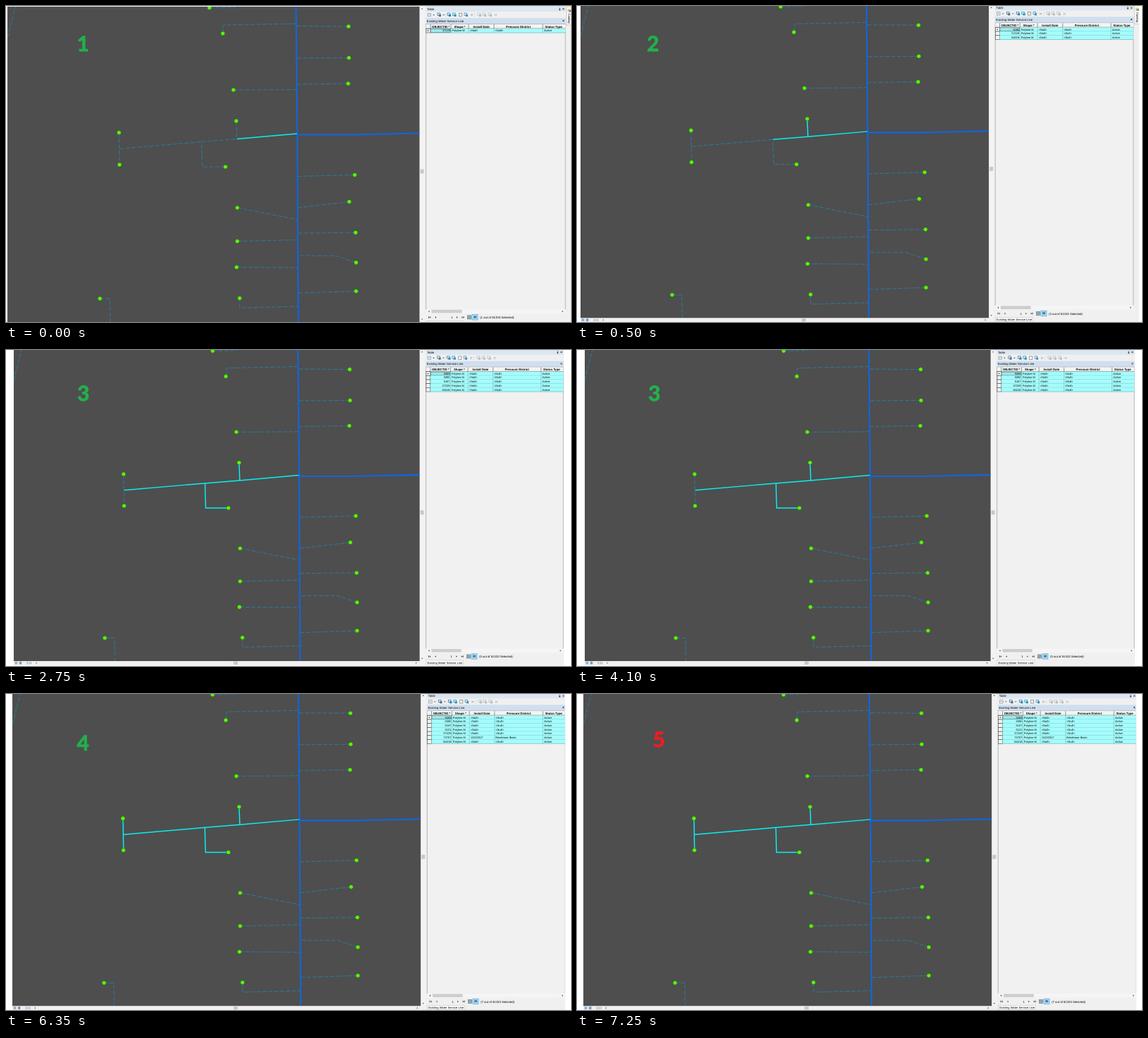
These frames come from a looping animation (800 px wide and 448 px high, 8000 ms). An HTML page:

```html
<!DOCTYPE html>
<html lang="en">
<head>
<meta charset="utf-8">
<title>Service line trace</title>
<style>
  html, body { margin: 0; width: 100%; height: 100%; overflow: hidden; background: #fff; }
  svg { display: block; width: 800px; height: 448px; }
  text { font-family: "Liberation Sans", Arial, sans-serif; text-rendering: geometricPrecision; }
  .step { font: 700 29.5px Lato, "Open Sans", sans-serif; stroke-width: .9px; }
</style>
</head>
<body>
<svg id="stage" viewBox="0 0 800 448"></svg>
<script>
const LOOP = 8000;
const GREEN = '#22b14c', RED = '#ed1c24';

// view: x scale, y scale, x shift, y shift, right edge; depth: how far the trace has run
const scenes = [
  { at: 0,    view: [1, 1, 0, 0, 800],             depth: 1, label: ['1', 109, 64, GREEN] },
  { at: 500,  view: [.991, .991, 2.9, -1.5, 796],  depth: 2, label: ['2', 107.5, 64, GREEN] },
  { at: 2750, view: [.985, .987, 8.9, -1.1, 790],  depth: 3, label: ['3', 109.5, 72, GREEN] },
  { at: 5000, view: [.991, .991, 7, -1.5, 791.5],  depth: 4, label: ['4', 109, 80, GREEN] },
  { at: 7250, view: [.991, .991, 7, -1.5, 791.5],  depth: 4, label: ['5', 116, 74.5, RED] }
];

// Services: each starts at its meter dot
const services = [
  'M288 2.5 324 1.5V-2', 'M307 39 308 27 411 25', 'M322 119 412 118.5',
  'M327.5 286 413 303', 'M327.5 333.5 413 331.5', 'M326.5 370.3 413 371',
  'M330.8 414.3 331 428 414 426', 'M133 414.8H147L147.5 448',
  'M485 29 411 28.5', 'M485.5 73.5 411 74', 'M484.5 110 412 111',
  'M493.8 239.5 413 241.5', 'M486 277.5 413 286', 'M495 321.2 413 322',
  'M495.7 363.7 467 354H413', 'M495.7 404.3 414 407'
];
// Traced network: [depth at which it is selected, path]
const traced = [
  [1, 'M327 188.5 412 181'],
  [2, 'M326 163 327 188.5'],
  [2, 'M277 192.5 327 188.5'],
  [3, 'M310.5 228H278L277 192.5'],
  [3, 'M161 202.5 277 192.5'],
  [4, 'M160 179.5 161 225']
];
const tracedDots = [[326, 163], [310.7, 228], [160, 179.5], [160.7, 225]];

// Table records: [depth, id, install date, district]
const records = [
  [3, '5089'], [2, '5090'], [3, '5107'], [4, '5121'], [1, '37229'],
  [4, '73707', '1/20/2017', 'Brindmoor Basin'], [2, '84218']
];
const columns = [[601, 630, 'OBJECTID *'], [630, 655, 'Shape *'], [655, 691, 'Install Date'],
  [691, 760, 'Pressure District'], [760, 791, 'Status Type']];

const rect = (x, y, w, h, fill, more = '') =>
  `<rect x="${x}" y="${y}" width="${w}" height="${h}" fill="${fill}" ${more}/>`;
const path = (d, color, width = 1, more = '') =>
  `<path d="${d}" fill="none" stroke="${color}" stroke-width="${width}" ${more}/>`;
const solid = (d, fill) => `<path d="${d}" fill="${fill}"/>`;
const dot = ([x, y]) => `<circle cx="${x}" cy="${y}" r="2.8" fill="#55ff00" stroke="#3f6a2a" stroke-width=".5"/>`;
const text = (s, x, y, size = 4.3, more = '') =>
  `<text x="${x}" y="${y}" font-size="${size}" ${more}>${s.replace(/</g, '&lt;').replace(/>/g, '&gt;')}</text>`;
const arrow = (x, y, dir, fill = '#333') => solid(`M${x} ${y - 1.3}v2.6l${1.5 * dir}-1.3z`, fill);
const cross = (x, y, color, r = 1.1) =>
  path(`M${x - r} ${y - r}l${2 * r} ${2 * r}m0 ${-2 * r}l${-2 * r} ${2 * r}`, color, .8);
const dashed = d => path(d, '#2581a8', .9, 'stroke-dasharray="6 2.4"');

function drawMap(depth) {
  let s = rect(2, 1, 583.7, 447, '#4e4e4e') + '<g clip-path="url(#map)">';
  s += dashed('M14 -2 2.5 44') + services.map(dashed).join('');
  s += traced.filter(t => t[0] > depth).map(t => dashed(t[1])).join('');
  s += path('M410.6 -2 412.4 182 413.9 450', '#0669fb', 1.8);
  s += path('M412.4 182.4H490L588 180.4', '#0669fb', 1.8);
  s += traced.filter(t => t[0] <= depth).map(t => path(t[1], '#08eef2', 1.5)).join('');
  const ends = services.map(d => d.match(/[\d.]+/g).slice(0, 2));
  return s + [...ends, ...tracedDots].map(dot).join('') + '</g>';
}

function drawScrollbars() {
  let s = rect(585.7, 0, 6.8, 448, '#f3f3f3') + rect(586.6, 231.5, 5, 6, '#c8c8c8');
  s += solid('M587.8 4.5h2.6l-1.3-1.6z', '#555') + solid('M587.8 443.5h2.6l-1.3 1.6z', '#555');
  s += rect(2, 448, 583.7, 5.7, '#f0f0f0') + rect(318, 448.4, 6, 4.6, '#c8c8c8');
  s += rect(3.5, 448.7, 4, 3.8, '#8bb5d8') + rect(10, 448.7, 3.5, 3.8, '#7c98b4');
  s += path('M21.5 449v3.5m3-3.5v3.5', '#6b8cae', .9) + path('M27 449.3v3', '#6b8cae', .8);
  return s + arrow(35, 450.7, -1, '#555') + arrow(580, 450.7, 1, '#555');
}

function drawToolbar() {
  let s = rect(597, 10.3, 4.6, 4.4, '#e8eef4', 'stroke="#8291a0" stroke-width=".6"');
  s += path('M597 12.3h4.6', '#8291a0', .5);
  for (const x of [604.5, 618.5]) s += solid(`M${x} 12h2.4l-1.2 1.4z`, '#333');
  [[611, '#4d7795'], [625, '#2f86b5'], [632.5, '#2498c4'], [649, '#4b94b8'],
   [668, '#b9bdc1'], [675, '#b9bdc1'], [683, '#b9bdc1']].forEach(([x, c]) => {
    s += rect(x, 10, 3.6, 3.3, '#f7fafc', `stroke="${c}" stroke-width=".8"`) + rect(x + 1.8, 11.8, 3.2, 3.2, c);
  });
  s += rect(641.5, 10.2, 4, 4.4, '#fff', 'stroke="#777" stroke-width=".7"');
  return s + cross(659.5, 12.7, '#999', 1.4) + cross(693.5, 12.7, '#aaa', 1.4) +
    path('M622.5 10v5.5M664 10v5.5', '#d0d0d0', .5);
}

function drawTable(depth) {
  const rows = records.filter(r => r[0] <= depth);
  let s = rect(592.5, 0, 210, 454, '#f0f0f0') + rect(594.5, 0, 198, 8, '#dce6f1');
  s += text('Table', 596, 5.7) + path('M784 2.5v2.5m-1.2 0h2.4m-1.2 0v1.6', '#333', .8) + cross(789.3, 4.2, '#222');
  s += drawToolbar();
  s += rect(594.5, 17, 198, 8.2, '#cfdff0') + text('Existing Water Service Line', 595.8, 22.6) + cross(789.3, 20.8, '#222');
  s += rect(594.8, 25.6, 197.2, 403.5, '#f1f1f1') + path('M594.7 430V25.6H792V430', '#8a8f94', .6);

  s += rect(595, 26, 197, 6, '#f4f4f4') + path('M595 32H792', '#444', .6);
  for (const [a, b, title] of columns) {
    s += text(title, (a + b) / 2, 30.7, 4.35, 'font-weight="700" text-anchor="middle"');
    s += path(`M${a} 26v6`, '#555', .6);
  }
  rows.forEach(([, id, date = '<Null>', district = '<Null>'], i) => {
    const y = 32.2 + 5.75 * i, base = y + 4.2;
    s += rect(595, y, 6, 5.75, '#f4f4f4', 'stroke="#444" stroke-width=".6"');
    s += rect(601, y, 191, 5.75, '#a4fcfc');
    s += path(`M601 ${y + 5.75}H792`, '#66a8a8', .6);
    for (const [a] of columns) s += path(`M${a} ${y}v5.75`, '#66a8a8', .5);
    if (!i) {
      s += rect(601.4, y + .4, 28.2, 5, '#9aeaea', 'stroke="#456" stroke-width=".5"');
      s += arrow(597.2, y + 2.9, 1);
    }
    s += text(id, 629, base, 4, 'text-anchor="end"') + text('Polyline M', 631.5, base, 3.9);
    s += text(date, 656.8, base, 4) + text(district, 692.5, base, 4) + text('Active', 761.8, base, 4);
  });

  s += rect(595, 430, 197, 6, '#f5f5f5') + rect(602.5, 430.6, 43, 4.6, '#cdcdcd');
  s += arrow(599.5, 433, -1) + arrow(787.5, 433, 1);
  s += path('M598.6 440v2.8M648 440v2.8', '#222', .8);
  s += arrow(601.2, 441.4, -1, '#222') + arrow(609, 441.4, -1, '#222');
  s += text('1', 632.5, 443, 4.2, 'text-anchor="end"');
  s += arrow(638, 441.4, 1, '#222') + arrow(645.5, 441.4, 1, '#222');
  s += rect(653.5, 438.8, 5, 5, '#aac4d2', 'stroke="#55707e" stroke-width=".7"') + path('M653.5 441.3h5m-2.5-2.5v5', '#55707e', .5);
  s += rect(660, 437.6, 8, 7.4, '#b8dff8', 'stroke="#4ba3d8" stroke-width=".7"') + rect(662, 439.3, 4.2, 3.4, '#4d87a8');
  s += text(`(${rows.length} out of 81333 Selected)`, 671.2, 443);
  s += rect(595, 446.8, 53, 6.2, '#fff', 'stroke="#b5b5b5" stroke-width=".5"') + text('Existing Water Service Line', 596.5, 451.5, 4.15);

  // Docked side tab
  s += rect(793.4, 1, 8, 26, '#f7f7f7', 'stroke="#b4b4b4" stroke-width=".6"');
  s += rect(795.3, 4.3, 4.5, 4, '#e8c65a') + rect(797, 6, 3, 2.4, '#6d8ca6');
  return s + '<g transform="translate(796 10.5) rotate(90)">' + text('Catalog', 0, 0, 4.1) + '</g>';
}

function draw({ view: [sx, sy, tx, ty, right], depth, label: [n, x, y, color] }) {
  const left = tx ? tx + 2 * sx : 0;
  return `<defs><clipPath id="map">${rect(2, 1, 583.7, 447, '#000')}</clipPath>
    <clipPath id="screen">${rect(left, 0, right - left, 448, '#000')}</clipPath></defs>
    <g clip-path="url(#screen)"><g transform="matrix(${sx} 0 0 ${sy} ${tx} ${ty})">
    ${rect(0, 0, 802, 454, '#f0f0f0')}${drawMap(depth)}${drawScrollbars()}${drawTable(depth)}</g></g>
    <text class="step" x="${x}" y="${y}" text-anchor="middle" fill="${color}" stroke="${color}">${n}</text>`;
}

const stage = document.getElementById('stage');
const start = performance.now();
let shown = null;

function tick() {
  const t = Math.max(0, performance.now() - start) % LOOP;
  const scene = scenes.filter(s => s.at <= t).pop();
  if (scene !== shown) {
    stage.innerHTML = draw(scene);
    shown = scene;
  }
  requestAnimationFrame(tick);
}
tick();
</script>
</body>
</html>
```
